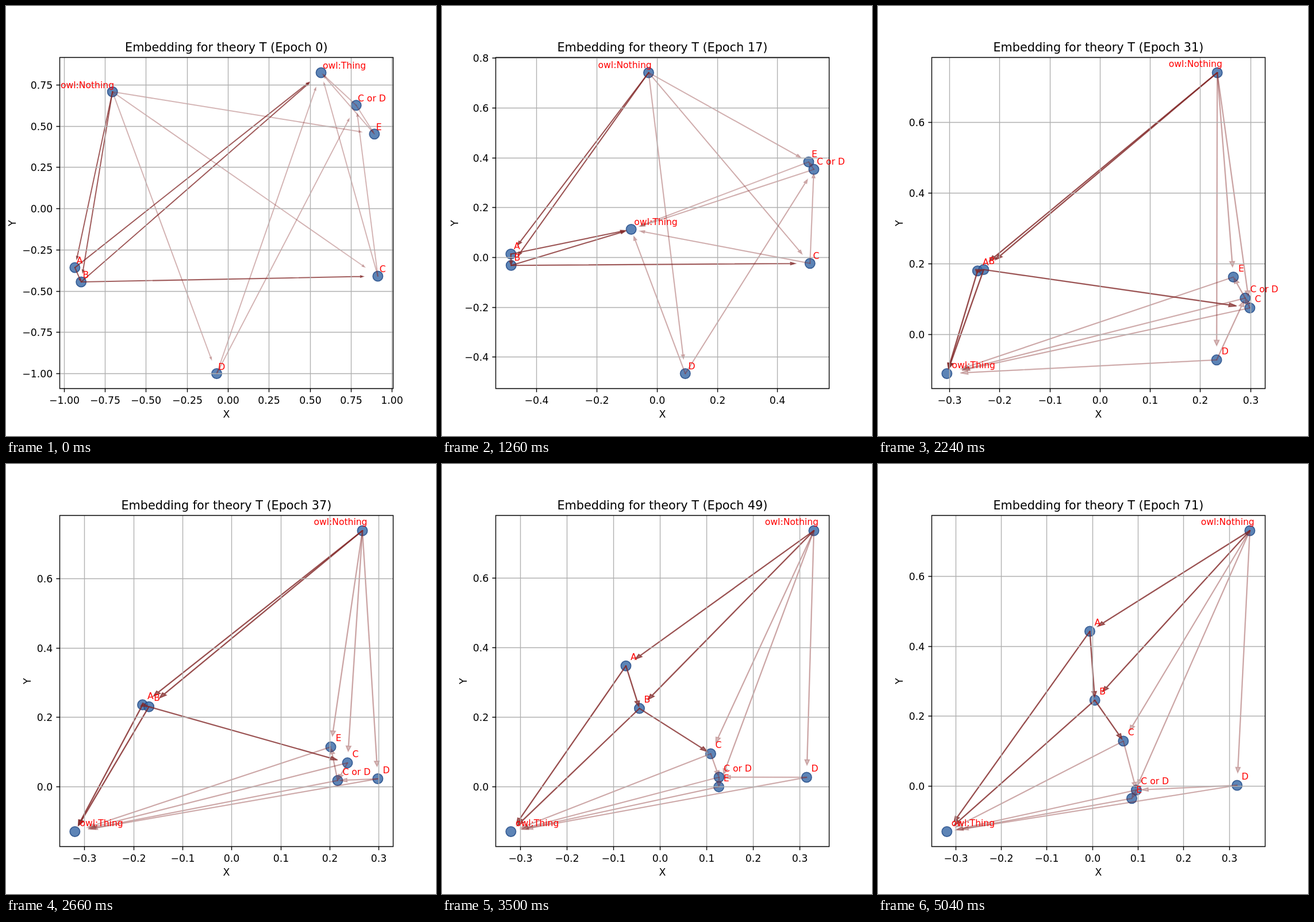
Animation, 748 px wide and 748 px high, one loop 5180 ms. Source, as an HTML page:

```html
<!DOCTYPE html>
<html>
<head>
<meta charset="utf-8">
<style>
  html, body { margin: 0; width: 100%; height: 100%; overflow: hidden; background: #fff; }
  svg { display: block; width: 748px; height: 748px; font-family: "DejaVu Sans", Verdana, sans-serif; }
</style>
</head>
<body>
<svg id="plot" viewBox="0 0 748 748"></svg>
<script>
const PT = 748 / 6 / 72;                       // pixels per point
const BOX = { l: 93.5, r: 673.2, t: 89.76, b: 665.72 };
const STEP_MS = 140, STEPS = 37;
const svg = document.getElementById("plot");

// Positions of every node at a few epochs
const epochs = [0, 9, 25, 37, 49, 59, 71];
const nodes = {
  A: { name: "A", x: [-.934, -.688, -.322, -.182, -.073, .003, -.006], y: [-.357, -.118, .117, .2365, .3475, .366, .443] },
  B: { name: "B", x: [-.896, -.692, -.309, -.169, -.044, -.001, .005], y: [-.444, -.191, .095, .231, .225, .238, .246] },
  C: { name: "C", x: [.912, .676, .371, .236, .109, .0775, .0675], y: [-.409, -.21, .082, .069, .0945, .158, .129] },
  D: { name: "D", x: [-.07, .039, .148, .298, .315, .317, .317], y: [-1, -.715, -.24, .023, .0265, .022, .0025] },
  E: { name: "E", x: [.891, .681, .351, .202, .1265, .074, .086], y: [.453, .502, .218, .115, -.001, -.035, -.035] },
  U: { name: "C or D", x: [.78, .66, .38, .216, .127, .09, .096], y: [.627, .469, .237, .018, .027, -.006, -.011] },
  T: { name: "owl:Thing", x: [.566, .201, -.268, -.32, -.32, -.3195, -.3195], y: [.825, .396, -.064, -.1295, -.13, -.1295, -.13] },
  N: { name: "owl:Nothing", x: [-.705, -.342, .185, .2665, .3305, .345, .345], y: [.709, .741, .742, .739, .737, .734, .731] }
};
const strong = "NA NB AT BT AB BC".split(" ");
const weak = "NC ND NE CT DT ET UT CU DU UE".split(" ");

// Monotone cubic through the values at the known epochs
function curve(v, e) {
  const n = epochs.length;
  const slope = i => (v[i + 1] - v[i]) / (epochs[i + 1] - epochs[i]);
  const tangent = i => {
    if (i === 0) return slope(0);
    if (i === n - 1) return slope(n - 2);
    const a = slope(i - 1), b = slope(i);
    return a * b > 0 ? 2 * a * b / (a + b) : 0;
  };
  let i = 0;
  while (i < n - 2 && e >= epochs[i + 1]) i++;
  const h = epochs[i + 1] - epochs[i], u = (e - epochs[i]) / h, w = 1 - u;
  return v[i] * (1 + 2 * u) * w * w + v[i + 1] * u * u * (3 - 2 * u)
    + h * u * w * (tangent(i) * w - tangent(i + 1) * u);
}

// Linear axis with 5% margins and round tick values
function makeAxis(values, from, to) {
  const min = Math.min(...values), max = Math.max(...values);
  const pad = (max - min) * .05, lo = min - pad, hi = max + pad;
  const raw = (hi - lo) / 9, unit = 10 ** Math.floor(Math.log10(raw));
  const mult = [1, 2, 2.5, 5, 10].find(m => m * unit >= raw), step = mult * unit;
  const digits = Math.max(0, -Math.floor(Math.log10(unit) + 1e-9) + (mult === 2.5 ? 1 : 0) - (mult === 10 ? 1 : 0));
  const scale = (to - from) / (hi - lo), map = v => from + (v - lo) * scale;
  const ticks = [];
  for (let i = Math.ceil(lo / step); i * step <= hi; i++)
    ticks.push({ at: Math.floor(map(i * step)) + .5, label: (i * step).toFixed(digits).replace("-", "\u2212") });
  return { map, ticks };
}

const text = (x, y, s, pt, anchor = "middle", extra = "") =>
  `<text x="${x}" y="${y}" font-size="${pt * PT}" text-anchor="${anchor}" ${extra}>${s}</text>`;
const path = (d, color, width) => `<path d="${d}" fill="none" stroke="${color}" stroke-width="${width * PT}"/>`;

function arrow(p, q, X, Y, alpha) {
  const dx = q.x - p.x, dy = q.y - p.y, full = Math.hypot(dx, dy);
  const ux = dx / full, uy = dy / full, len = full * .95, neck = len - .015;
  const at = (along, side) => X.map(p.x + ux * along - uy * side).toFixed(2) + "," + Y.map(p.y + uy * along + ux * side).toFixed(2);
  const pts = [at(0, .0005), at(neck, .0005), at(neck, .005), at(len, 0), at(neck, -.005), at(neck, -.0005), at(0, -.0005)];
  return `<polygon points="${pts.join(" ")}" fill="#802626" stroke="#802626" fill-opacity="${alpha}" stroke-opacity="${alpha}" stroke-width="${PT}"/>`;
}

function draw(epoch) {
  const pos = {};
  for (const k in nodes) pos[k] = { x: curve(nodes[k].x, epoch), y: curve(nodes[k].y, epoch) };
  const all = Object.values(pos);
  const X = makeAxis(all.map(p => p.x), BOX.l, BOX.r);
  const Y = makeAxis(all.map(p => p.y), BOX.b, BOX.t);
  const midX = (BOX.l + BOX.r) / 2, midY = (BOX.t + BOX.b) / 2;
  const tick = 3.5 * PT, font = 10 * PT;
  let out = "", grid = "", marks = "", labels = "", widest = 0;

  for (const p of all)
    out += `<circle cx="${X.map(p.x)}" cy="${Y.map(p.y)}" r="${5 * PT}" fill="#3465a4" stroke="#204a87" fill-opacity=".8" stroke-opacity=".8" stroke-width="${PT}"/>`;
  for (const [list, alpha] of [[weak, .3], [strong, .7]])
    for (const [a, b] of list) out += arrow(pos[a], pos[b], X, Y, alpha);

  for (const { at, label } of X.ticks) {
    grid += `M${at} ${BOX.t}V${BOX.b}`;
    marks += `M${at} ${BOX.b}v${tick}`;
    labels += text(at, 691.6, label, 10);
  }
  for (const { at, label } of Y.ticks) {
    grid += `M${BOX.l} ${at}H${BOX.r}`;
    marks += `M${BOX.l} ${at}h${-tick}`;
    labels += text(BOX.l - 2 * tick, at + 6.3, label, 10, "end");
    // glyph widths in em: minus .838, point .318, digit .636
    const em = [...label].reduce((s, c) => s + (c === "\u2212" ? .838 : c === "." ? .318 : .636), 0);
    widest = Math.max(widest, em * font);
  }
  const yLabel = BOX.l - 2 * tick - widest - 4 * PT - .236 * font;

  out += path(grid, "#b0b0b0", .8) + path(marks, "#000", .8);
  out += path("M93.5 89.5H673.5V665.5H93.5Z", "#000", .8) + labels;
  for (const k in nodes)
    out += text(X.map(pos[k].x + .01), Y.map(pos[k].y + .01) - 3.7, nodes[k].name, 9, k === "N" ? "end" : "start", 'fill="red"');
  out += text(midX, 716.3, "X", 10);
  out += text(0, 0, "Y", 10, "middle", `transform="translate(${yLabel} ${midY}) rotate(-90)"`);
  out += text(midX, 79.4, `Embedding for theory T (Epoch ${epoch})`, 12);
  svg.innerHTML = out;
}

let shown = -1;
function tickFrame() {
  const step = Math.floor(performance.now() / STEP_MS) % STEPS;
  if (step !== shown) draw(Math.max(0, 2 * step - 1));
  shown = step;
  requestAnimationFrame(tickFrame);
}
tickFrame();
</script>
</body>
</html>
```
